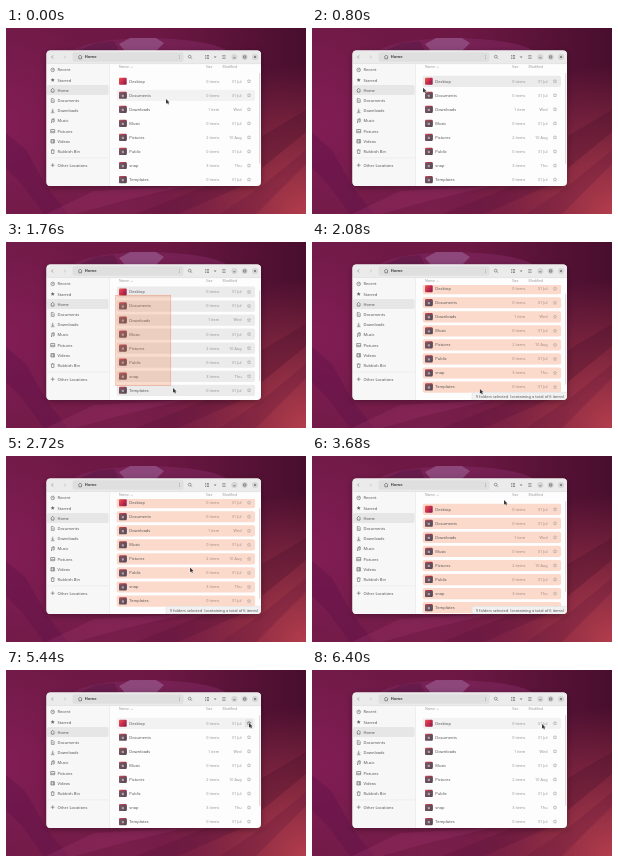
An HTML page with a canvas for the animation above (6480 ms loop, 300 by 186 pixels).

```html
<!DOCTYPE html>
<html lang="en">
<head>
<meta charset="utf-8">
<title>File selection</title>
<style>
html, body { margin: 0; width: 100%; height: 100%; overflow: hidden; background: #6f1a48; }
canvas { display: block; width: 300px; height: 186px; }
</style>
</head>
<body>
<canvas id="stage" width="300" height="186"></canvas>
<script>
const ctx = document.getElementById('stage').getContext('2d');
const LOOP = 6480, STEP = 80;
const FONT = '"Noto Sans", "Open Sans", sans-serif';
const WIN = { x: 40.5, y: 22.5, w: 214.5, h: 135.5 };
const RIGHT = WIN.x + WIN.w, BOTTOM = WIN.y + WIN.h;
const ROW_TOP = 53.3, ROW_GAP = 14.05, ROW_X = 110.7, ROW_W = 138.3;
const DRAG_START = 720, DRAG_END = 2080, CLEAR = 3920;
const BAND_X = 109.5, BAND_Y = 56.5, MAX_SCROLL = 6.6;

const folders = [
  ['Desktop', '0 items', '31 Jul'], ['Documents', '0 items', '31 Jul'],
  ['Downloads', '1 item', 'Wed'], ['Music', '0 items', '31 Jul'],
  ['Pictures', '2 items', '10 Aug'], ['Public', '0 items', '31 Jul'],
  ['snap', '3 items', 'Thu'], ['Templates', '0 items', '31 Jul']
];
const places = ['Recent', 'Starred', 'Home', 'Documents', 'Downloads',
  'Music', 'Pictures', 'Videos', 'Rubbish Bin'];

// Pointer stops: time, x, y
const stops = [
  [0, 160, 71], [480, 110, 56], [DRAG_START, 109.5, 56.5], [1280, 137, 115],
  [1760, 167, 146], [2160, 168, 147], [2720, 184, 111.5], [3520, 192, 44],
  [3920, 192, 44], [4560, 243, 53], [6320, 243, 53], [6400, 230, 54]
];

function pointerAt(t) {
  const i = stops.findIndex(s => s[0] > t);
  if (i < 0) return stops[stops.length - 1].slice(1);
  const [a, b] = [stops[i - 1], stops[i]];
  const u = (t - a[0]) / (b[0] - a[0]);
  const e = u * u * (3 - 2 * u);
  return [a[1] + (b[1] - a[1]) * e, a[2] + (b[2] - a[2]) * e];
}

const ramp = (t, from, to) => Math.min(1, Math.max(0, (t - from) / (to - from)));

// The list scrolls down while the drag reaches its edge, then back up.
const scrollAt = t => MAX_SCROLL * (ramp(t, 1520, 2000) - ramp(t, 3040, 3360));

function box(x, y, w, h, r, fill) {
  ctx.beginPath();
  ctx.roundRect(x, y, w, h, r);
  ctx.fillStyle = fill;
  ctx.fill();
}

function shape(d, fill) {
  ctx.fillStyle = fill;
  ctx.fill(new Path2D(d));
}

function stroke(d, color, width = 0.7) {
  ctx.strokeStyle = color;
  ctx.lineWidth = width;
  ctx.stroke(new Path2D(d));
}

function text(s, x, y, { size = 4, color = '#555', align = 'left', weight = 400 } = {}) {
  ctx.font = `${weight} ${size}px ${FONT}`;
  ctx.textAlign = align;
  ctx.textBaseline = 'alphabetic';
  ctx.fillStyle = color;
  ctx.fillText(s, x, y + size * 0.36);
}

function gradient(x0, y0, x1, y1, ...colors) {
  const g = ctx.createLinearGradient(x0, y0, x1, y1);
  colors.forEach((c, i) => g.addColorStop(i / (colors.length - 1), c));
  return g;
}

function glow(x, y, r, rgb, alpha) {
  const g = ctx.createRadialGradient(x, y, 0, x, y, r);
  g.addColorStop(0, `rgba(${rgb},${alpha})`);
  g.addColorStop(1, `rgba(${rgb},0)`);
  ctx.fillStyle = g;
  ctx.fillRect(0, 0, 300, 186);
}

function wallpaper() {
  ctx.fillStyle = gradient(0, 0, 300, 0, '#701a47', '#6d1844', '#480e2d');
  ctx.fillRect(0, 0, 300, 186);
  glow(0, 95, 110, '145,32,96', 0.55);
  glow(300, 186, 150, '190,66,80', 0.9);
  glow(120, 186, 110, '135,38,82', 0.45);
  shape('M66 23Q84 11 142 10Q202 11 222 23Z', 'rgba(125,38,92,.65)');
  shape('M113 16L124 10H150L158 15L150 23H119Z', 'rgba(152,88,140,.7)');
  shape('M72 23L90 15L108 13L113 23Z', 'rgba(72,18,62,.35)');
  shape('M0 105L20 122L40 158L62 186H38L16 156L0 140Z', 'rgba(90,16,72,.35)');
  shape('M40 186L88 163L180 158L120 172L70 186Z', 'rgba(155,52,108,.3)');
  shape('M130 186L200 158H236L172 186Z', 'rgba(88,18,58,.3)');
  shape('M256 108L300 82V104L256 140Z', 'rgba(70,14,44,.3)');
  shape('M214 186L256 158L300 122V136L250 186Z', 'rgba(105,24,60,.3)');
}

function star(x, y, r, color, filled) {
  ctx.beginPath();
  for (let i = 0; i < 10; i++) {
    const a = i * Math.PI / 5 - Math.PI / 2, q = i % 2 ? r * 0.45 : r;
    ctx.lineTo(x + q * Math.cos(a), y + q * Math.sin(a));
  }
  ctx.closePath();
  ctx.fillStyle = ctx.strokeStyle = color;
  ctx.lineWidth = 0.55;
  filled ? ctx.fill() : ctx.stroke();
}

function home(x, y) {
  stroke(`M${x - 2} ${y}L${x} ${y - 2}L${x + 2} ${y}M${x - 1.3} ${y}v1.8h2.6v-1.8`, '#666');
}

const placeIcons = [
  (x, y) => stroke(`M${x - 1.8} ${y}a1.8 1.8 0 1 0 3.6 0a1.8 1.8 0 1 0 -3.6 0M${x} ${y - 1}v1h.9`, '#666', 0.6),
  (x, y) => star(x, y, 2.1, '#666', true),
  home,
  (x, y) => stroke(`M${x - 1.4} ${y - 1.9}h2l.9 1v2.8h-2.9zM${x - .6} ${y + .3}h1.3`, '#666', 0.6),
  (x, y) => stroke(`M${x} ${y - 2}v3M${x - 1.2} ${y}l1.2 1.2l1.2-1.2M${x - 1.8} ${y + 2}h3.6`, '#666', 0.6),
  (x, y) => stroke(`M${x - .8} ${y + 1.4}v-3l2.2-.5v3M${x - 1.7} ${y + 1.5}h1M${x + .5} ${y + 1}h1`, '#666', 0.8),
  (x, y) => stroke(`M${x - 2} ${y - 1.6}h4v3.2h-4zM${x - 1.7} ${y + 1.2}l1.2-1.4l1 .8l.6-.7l.8 1`, '#666', 0.6),
  (x, y) => stroke(`M${x - 1.8} ${y - 1.7}h3.6v3.4h-3.6zM${x - .8} ${y - 1.7}v3.4M${x + .8} ${y - 1.7}v3.4`, '#666', 0.6),
  (x, y) => stroke(`M${x - 1.8} ${y - 1.4}h3.6M${x - 1.3} ${y - 1.2}l.2 3.2h2.2l.2-3.2M${x - .5} ${y - 2}h1`, '#666', 0.6)
];

function header() {
  box(WIN.x, WIN.y, WIN.w, 13.5, [4, 4, 0, 0], '#ebebeb');
  box(66.5, 24.3, 111, 9.5, 2, '#dfdfdf');
  stroke('M47 27.5l-1.4 1.5l1.4 1.5', '#888');
  stroke('M58.2 27.5l1.4 1.5l-1.4 1.5', '#bbb');
  home(74.2, 29);
  text('Home', 78.7, 29, { weight: 700, color: '#444' });
  for (const dy of [-1.4, 0, 1.4]) box(173, 28.6 + dy, 0.8, 0.8, 0.4, '#777');
  stroke('M182.3 28.6a1.4 1.4 0 1 0 2.8 0a1.4 1.4 0 1 0 -2.8 0M184.8 29.6l1.2 1.2', '#777');
  for (const dy of [-1.5, 0, 1.5]) {
    stroke(`M199 ${29 + dy}h.9M200.7 ${29 + dy}h2.3`, '#777', 0.8);
    stroke(`M216.2 ${29 + dy}h3.4`, '#777', 0.6);
  }
  shape('M207.7 28.4h2.8l-1.4 1.6z', '#777');
  for (const x of [228.3, 238.7, 249]) box(x - 3, 26, 6, 6, 3, '#d5d5d5');
  stroke('M227 29.8h2.6M237.6 27.9h2.2v2.2h-2.2zM248 28l2 2m0-2l-2 2', '#555', 0.6);
  ctx.fillStyle = '#dcdcdc';
  ctx.fillRect(WIN.x, 35.6, WIN.w, 0.5);
}

function sidebar() {
  box(WIN.x, 36, 103.5 - WIN.x, BOTTOM - 36, [0, 0, 0, 4], '#f7f7f7');
  box(41, 57, 61.5, 10, 1.5, '#e6e6e6');
  places.forEach((name, i) => {
    const y = 41.9 + i * 10.2;
    placeIcons[i](46.7, y);
    text(name, 51.5, y);
  });
  ctx.fillStyle = '#e2e2e2';
  ctx.fillRect(41, 129.7, 62, 0.5);
  ctx.fillRect(103.5, 36, 0.5, BOTTOM - 36);
  stroke('M44.8 137.2h3.8M46.7 135.3v3.8', '#777');
  text('Other Locations', 51.5, 137.2);
}

function folder(y, index) {
  const x = 113;
  if (index === 0) {
    box(x, y - 3.5, 7.7, 7, 1, gradient(x, y - 3, x + 8, y + 3, '#ee5546', '#c52a50', '#7a1d48'));
    return;
  }
  box(x, y - 3.7, 7.7, 6, 1, gradient(x, y, x + 8, y, '#d4474c', '#8f3552'));
  box(x, y - 2.6, 7.7, 6.1, 0.9, gradient(x, y - 2, x + 8, y + 3, '#7a5663', '#534953'));
  box(x + 2.8, y - 0.7, 2.2, 2.3, 0.6, '#b09fa9');
}

function row(y, fill) {
  box(ROW_X, y - 5.6, ROW_W, 11.2, 1.8, fill);
}

function list(t, [px, py]) {
  const dragging = t >= DRAG_START && t < DRAG_END;
  const selected = t >= DRAG_END && t < CLEAR;
  const scroll = scrollAt(t);
  const faint = { color: selected ? '#a08a82' : '#959595', align: 'right', size: 3.8 };
  const label = { size: 3.5, color: '#999' };
  text('Name', 113, 39.2, label);
  stroke('M124.7 39.8l1-1l1 1', '#aaa', 0.5);
  text('Size', 200, 39.2, label);
  text('Modified', 216.5, 39.2, label);

  ctx.save();
  ctx.beginPath();
  ctx.rect(104, 43, RIGHT - 104, BOTTOM - 43);
  ctx.clip();
  folders.forEach(([name, size, date], i) => {
    const y = ROW_TOP + i * ROW_GAP - scroll;
    const hover = px > ROW_X && Math.abs(py - y) < 5.6;
    const caught = dragging && py > y - 5.6;
    if (selected) row(y, '#fcdacb');
    else if (caught) row(y, '#ebebeb');
    else if (hover) row(y, '#f2f2f2');
    folder(y, i);
    text(name, 123.3, y);
    text(size, 213.3, y, faint);
    text(date, 235.5, y, faint);
    const onStar = hover && Math.abs(px - 243) < 4;
    if (onStar) box(239, y - 4, 8, 8, 1.5, '#e3e3e3');
    star(243, y, 1.9, onStar ? '#555' : '#a5a5a5');
  });
  ctx.restore();
  box(253.3, 45 + scroll, 0.9, 91, 0.5, '#cdcdcd');

  if (dragging) {
    // The rubber band trails the pointer by one step.
    const [ex, ey] = pointerAt(Math.max(DRAG_START, t - STEP));
    const band = [BAND_X, BAND_Y - scroll, ex - BAND_X, ey - BAND_Y + scroll];
    ctx.fillStyle = 'rgba(240,120,70,.25)';
    ctx.fillRect(...band);
    ctx.strokeStyle = 'rgba(233,84,32,.45)';
    ctx.lineWidth = 0.5;
    ctx.strokeRect(...band);
  }
  if (selected) {
    box(160, 150.3, RIGHT - 160, BOTTOM - 150.3, [2, 0, 4, 0], '#f1f1f1');
    stroke(`M160 ${BOTTOM}v-5.7q0-2 2-2H${RIGHT}`, '#dcdcdc', 0.5);
    text('9 folders selected  (containing a total of 6 items)', 252, 154.3,
      { size: 3.93, color: '#555', align: 'right' });
  }
}

function pointer([x, y]) {
  const d = 'M0 0V4.8L1.2 3.8L2 5.6L2.9 5.1L2.1 3.4H3.6Z';
  ctx.save();
  ctx.translate(x, y);
  stroke(d, 'rgba(255,255,255,.8)', 0.8);
  shape(d, '#3a3a3a');
  ctx.restore();
}

function draw(now) {
  const t = Math.floor((now % LOOP) / STEP) * STEP;
  const p = pointerAt(t);
  wallpaper();
  ctx.save();
  ctx.shadowColor = 'rgba(0,0,0,.35)';
  ctx.shadowBlur = 6;
  ctx.shadowOffsetY = 1.5;
  box(WIN.x, WIN.y, WIN.w, WIN.h, 4, '#fdfdfd');
  ctx.restore();
  header();
  sidebar();
  list(t, p);
  pointer(p);
}

const start = performance.now();
function tick() {
  draw(performance.now() - start);
  requestAnimationFrame(tick);
}
tick();
</script>
</body>
</html>
```
